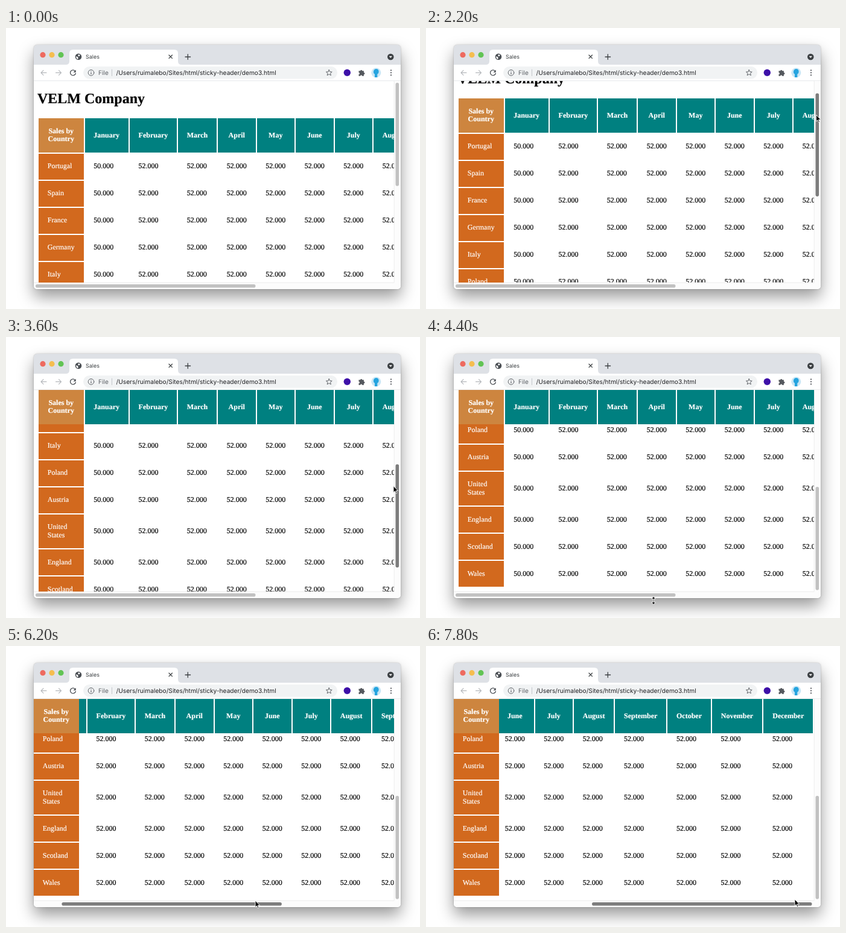
Recreate the animation shown at these times as an HTML page. Size 686x467 px, loop 8000 ms.

```html
<!DOCTYPE html>
<html lang="en">
<head>
<meta charset="utf-8">
<title>Sales</title>
<style>
  html, body { margin: 0; width: 100%; height: 100%; overflow: hidden; background: #fff; }
  #window {
    position: absolute; left: 46px; top: 28px; width: 608px; height: 406px;
    border-radius: 6px 6px 5px 5px; overflow: hidden; background: #fff;
    box-shadow: 0 0 1px rgba(0,0,0,.5), 0 13px 27px rgba(0,0,0,.4), 0 0 4px rgba(0,0,0,.1);
  }
  #page {
    position: absolute; left: 0; top: 60px; width: 597px; height: 335px; overflow: hidden;
    font: 12px/13.5px "Liberation Serif", serif; color: #000;
    text-rendering: geometricPrecision; -webkit-text-stroke: .2px;
  }
  #body { padding: 0 6px 6px; }
  h1 { margin: 16px 0; font-size: 24px; line-height: 28px; white-space: nowrap; }
  table { border-spacing: 2px; }
  th, td { padding: 14.75px; }
  th { position: sticky; color: #fff; }
  thead th { top: 0; z-index: 2; background: #008080; }
  tbody th { left: 0; z-index: 1; background: #d2691e; font-weight: normal; text-align: left; }
  thead th:first-child { left: 0; z-index: 3; background: #cd853f; }
  svg { position: absolute; left: 0; top: 0; font-family: Inter, sans-serif; text-rendering: geometricPrecision; }
  .line { fill: none; stroke-linecap: round; stroke-linejoin: round; }
</style>
</head>
<body>
<div id="window">
  <div id="page"><div id="body">
    <h1>VELM Company</h1>
    <table><thead></thead><tbody></tbody></table>
  </div></div>
</div>

<svg width="686" height="467" viewBox="0 0 686 467">
  <!-- tab strip -->
  <path d="M46 61V34a6 6 0 0 1 6-6H648a6 6 0 0 1 6 6V61Z" fill="#dee1e6"/>
  <path d="M99 61q6 0 6-6V42q0-6 6-6H279q6 0 6 6v13q0 6 6 6Z" fill="#fff"/>
  <circle cx="61" cy="44.7" r="4.6" fill="#ee6a5f"/>
  <circle cx="76" cy="44.7" r="4.6" fill="#f5bd4f"/>
  <circle cx="91" cy="44.7" r="4.6" fill="#61c454"/>
  <circle cx="120" cy="47.7" r="5.3" fill="#4a4e53"/>
  <path d="M116 47l2.6 1 1.4 2-1.6 2Q116 50 116 47ZM119.5 44l3.5.7-1.3 2-2 .6Z" fill="#fff"/>
  <text x="132" y="51" font-size="9" fill="#3c4043">Sales</text>
  <path class="line" d="M270 45l5.4 5.4m0-5.4l-5.4 5.4M297 48h8.6m-4.3-4.3v8.6" stroke="#3c4043" stroke-width="1.3"/>
  <circle cx="637.3" cy="48" r="5.3" fill="#3c4043"/>
  <path d="M634.6 46.800h5.4l-2.7 3Z" fill="#fff"/>

  <!-- toolbar -->
  <path d="M46 87.700H654" stroke="#dfe1e4" stroke-width=".8"/>
  <rect x="128" y="64" width="421" height="20.5" rx="10.25" fill="#f1f3f4"/>
  <path class="line" d="M67 74.300h-9m4-4l-4 4 4 4M82.500 74.300h9m-4-4l4 4-4 4" stroke="#b4b7bb" stroke-width="1.2"/>
  <path class="line" d="M114.800 71.800a4.500 4.500 0 1 0 .6 3.700" stroke="#4b4f54" stroke-width="1.3"/>
  <path d="M115.700 69.500v4.200h-4.200Z" fill="#4b4f54"/>
  <g class="line" stroke="#5f6368">
    <circle cx="141" cy="74.3" r="4.8"/>
    <path d="M141 74v2.500m0-4.700v.1" stroke-width="1.2"/>
    <path d="M175.500 69v10.500" stroke="#c3c6ca"/>
    <path d="M535.300 69.500l1.400 3.200 3.500.3-2.700 2.300.9 3.400-3.100-1.800-3.100 1.800.9-3.400-2.700-2.300 3.500-.3Z"/>
  </g>
  <g font-size="10.2">
    <text x="153" y="77.8" fill="#5f6368">File</text>
    <text x="182.5" y="77.8" fill="#202124">/Users/ruimalebo/Sites/html/sticky-header/demo3.html</text>
  </g>
  <circle cx="565.3" cy="74.3" r="5.7" fill="#3d10a8"/>
  <path d="M584.500 71.300h2.600a1.600 1.600 0 1 1 3.200 0h2.600v2.700a1.600 1.600 0 1 1 0 3.200v2.500h-2.800a1.500 1.500 0 1 0-3 0h-2.600v-2.700a1.500 1.500 0 1 0 0-3Z" fill="#54585d"/>
  <circle cx="613.3" cy="74.3" r="8" fill="#c9e6f5"/>
  <path d="M613.500 68c5.500 0 5 8 1.800 8.500v5.400h-4.300v-5.400c-3-.5-3-8.500 2.500-8.500Z" fill="#25a4df"/>
  <path class="line" d="M638 70.300v0m0 4v0m0 4v0" stroke="#54585d" stroke-width="2.3"/>

  <!-- scrollbars -->
  <path d="M643 88H654V429a5 5 0 0 1-5 5H51a5 5 0 0 1-5-5V423H643Z" fill="#fcfcfc"/>
  <path d="M643.200 88V423.200H46" fill="none" stroke="#e8e8e8" stroke-width=".8"/>
  <rect id="thumbV" x="645.5" y="91" width="5.6" height="171.5" rx="2.8"/>
  <rect id="thumbH" x="49" y="426" width="364.5" height="5.6" rx="2.8"/>

  <!-- pointers -->
  <g id="cursor" stroke="#fff" stroke-width=".9" stroke-linejoin="round">
    <path id="arrow" d="M0 0V10.800L2.500 8.500 4.200 12.500 5.900 11.800 4.200 7.900H7.600Z"/>
    <path id="resize" d="M0-6.800L3.300-2.800H.8V2.800H3.300L0 6.800-3.300 2.800H-.8V-2.800H-3.300Z"/>
  </g>
</svg>

<script>
const LOOP = 8000, STEP = 200, SCALE = .75;
const MAX_X = 365, MAX_Y = 300, TRAVEL_X = 226, TRAVEL_Y = 158;
const months = 'January February March April May June July August September October November December'.split(' ');
const countries = ['Portugal', 'Spain', 'France', 'Germany', 'Italy', 'Poland', 'Austria',
  'United States', 'England', 'Scotland', 'Wales'];

const $ = selector => document.querySelector(selector);
const cells = (tag, list) => list.map(text => `<${tag}>${text}</${tag}>`).join('');
const amounts = months.map((_, i) => i ? '52.000' : '50.000');
$('thead').innerHTML = `<tr>${cells('th', ['Sales by Country', ...months])}</tr>`;
$('tbody').innerHTML = countries.map(name => `<tr><th>${name}</th>${cells('td', amounts)}</tr>`).join('');

// Columns are whole pixels wide before the page is scaled down.
for (const th of document.querySelectorAll('thead th')) {
  const width = parseFloat(getComputedStyle(th).width);
  th.style.minWidth = Math.ceil(width / SCALE - .05) * SCALE + 'px';
}

const ramp = (t, from, to) => Math.min(1, Math.max(0, (t - from) / (to - from)));
const easeOut = k => 1 - (1 - k) ** 2;

const page = $('#page'), thumbV = $('#thumbV'), thumbH = $('#thumbH');
const shade = active => active ? '#7d7d7d' : '#c1c1c1';
const show = (id, on) => $(id).setAttribute('visibility', on ? 'visible' : 'hidden');

function draw(t) {
  const down = ramp(t, 1964, 4107), across = ramp(t, 5836, 7732);
  page.scrollTop = down * MAX_Y;
  page.scrollLeft = across * MAX_X;
  thumbV.setAttribute('y', 91 + down * TRAVEL_Y);
  thumbH.setAttribute('x', 49 + across * TRAVEL_X);
  thumbV.setAttribute('fill', shade(t >= 1200 && t <= 4000));
  thumbH.setAttribute('fill', shade(t >= 4800));

  // The pointer reaches one scrollbar, drags it, then crosses to the other.
  const arrive = easeOut(ramp(t, 200, 1400)), drift = ramp(t, 1400, 3000);
  const cross = ramp(t, 4000, 4400) ** 2, settle = ramp(t, 4400, 5000);
  const x = 470 + 181 * arrive - 9 * drift - 265 * cross - 11 * settle + 245 * across;
  const y = 300 - 173 * arrive + TRAVEL_Y * down + 153 * cross - 12 * settle - 5 * ramp(t, 5200, 7000);
  $('#cursor').setAttribute('transform', `translate(${x} ${y})`);
  const resizing = t === 4400;
  show('#arrow', t >= 200 && !resizing);
  show('#resize', resizing);
}

const start = performance.now();
function tick() {
  const t = (performance.now() - start) % LOOP;
  draw(Math.floor(t / STEP) * STEP);
  requestAnimationFrame(tick);
}
tick();
</script>
</body>
</html>
```
